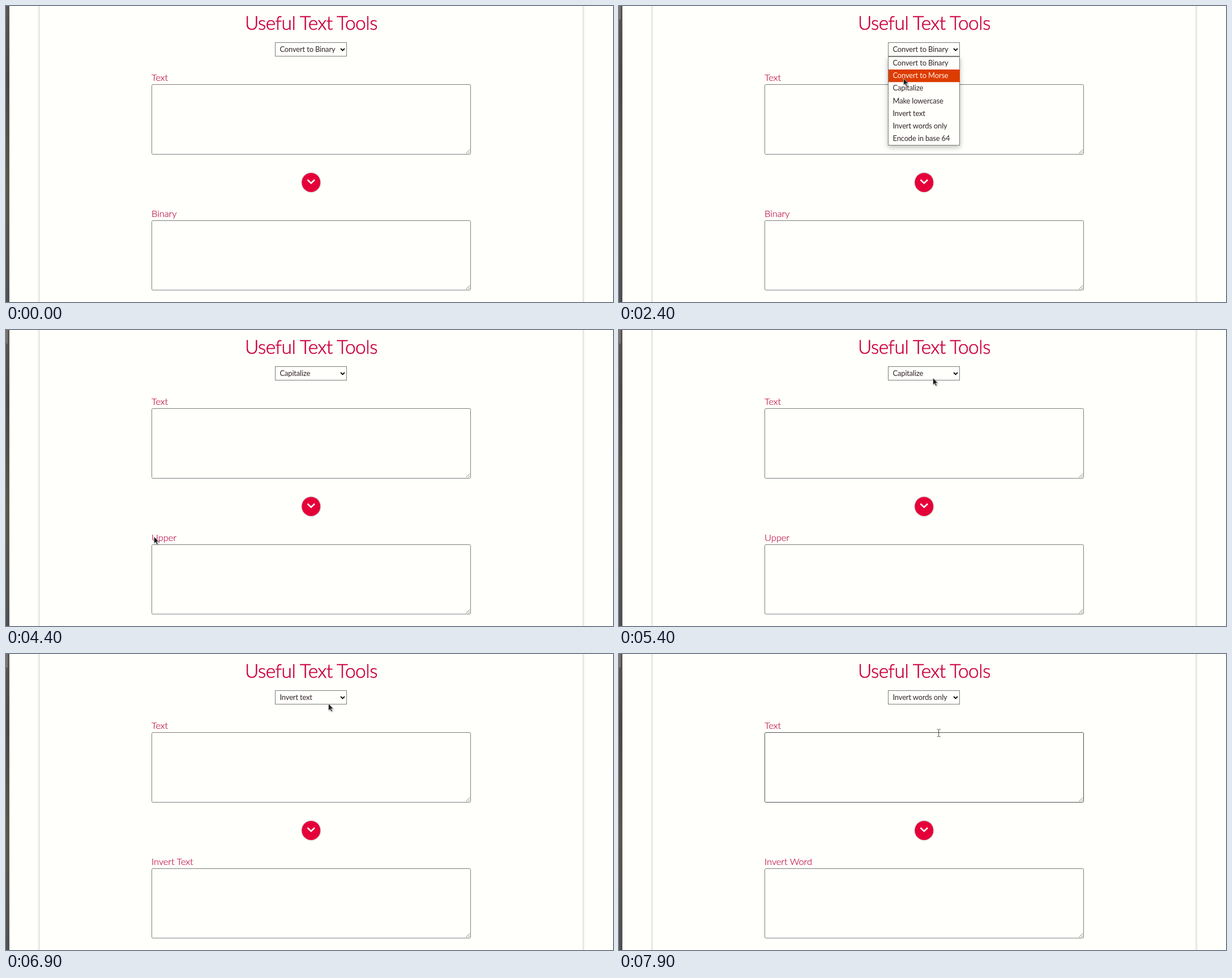
Write an HTML page that moves like this. It is 1072 px wide and 522 px high and loops after 8000 ms.

```html
<!DOCTYPE html>
<html lang="en">
<head>
<meta charset="utf-8">
<title>Useful Text Tools</title>
<style>
html, body { margin: 0; width: 100%; height: 100%; overflow: hidden; background: #fffffc; }
svg { display: block; width: 1072px; height: 522px; font-family: Lato, "Open Sans", sans-serif; }
.title { font-size: 33.5px; font-weight: 300; letter-spacing: -.5px; fill: #cc003f; stroke: #cc003f; stroke-width: .6; text-anchor: middle; }
.label { font-size: 16.5px; font-weight: 300; letter-spacing: -.1px; fill: #bd0a45; stroke: #bd0a45; stroke-width: .2; }
.option { font-size: 13px; letter-spacing: -.18px; fill: #33262a; }
.box { fill: #fffffc; stroke: #7c7c7c; }
.area.hover { stroke: #505050; }
.panel { fill: #fffffc; filter: drop-shadow(0 0 2px rgba(0, 0, 0, .33)); }
.menu { filter: drop-shadow(0 3px 5px rgba(0, 0, 0, .28)); }
.button { fill: #e60039; filter: drop-shadow(0 0 1px rgba(0, 0, 0, .5)); }
.line { fill: none; }
#arrow { filter: drop-shadow(1px 1px 1px rgba(0, 0, 0, .3)); }
</style>
</head>
<body>
<svg viewBox="0 0 1072 522">
  <defs>
    <linearGradient id="photo" x2="0" y2="1">
      <stop stop-color="#5a5552"/><stop offset=".25" stop-color="#4d4844"/>
      <stop offset=".6" stop-color="#5b5848"/><stop offset="1" stop-color="#505052"/>
    </linearGradient>
  </defs>
  <rect width="6" height="522" fill="url(#photo)"/>
  <rect id="patch" width="3" height="24" fill="#7b746c"/>
  <rect class="panel" x="59.5" y="-9" width="959" height="540"/>
  <text class="title" x="539" y="42">Useful Text Tools</text>

  <rect class="box" x="475.5" y="64.5" width="126" height="24"/>
  <text class="option" id="choice" x="483.5" y="81"></text>
  <path class="line" d="M591 75l3.5 3.5l3.5-3.5" stroke="#111" stroke-width="1.9"/>

  <text class="label" x="257" y="131.5">Text</text>
  <rect class="box area" id="input" x="257.5" y="138.5" width="563" height="123" rx="2"/>
  <text class="label" id="result" x="257" y="371.5"></text>
  <rect class="box area" x="257.5" y="378.5" width="563" height="122.5" rx="2"/>
  <path id="grip" class="line" d="M812.5 260l6.5-6.5m-2.5 6.5l2.5-2.5" stroke="#777"/>
  <use href="#grip" y="239.5"/>

  <ellipse class="button" cx="538.8" cy="311.2" rx="16.3" ry="16.8"/>
  <path class="line" d="M532.5 306.5l6.3 6l6.3-6" stroke="#fff" stroke-width="2.6"/>

  <g id="menu">
    <rect class="box menu" x="475.5" y="89.5" width="126" height="156"/>
    <rect id="mark" x="476" width="126" height="22.2" fill="#dd3c00"/>
    <g id="rows"></g>
  </g>

  <path id="arrow" d="M.5 .5v12.2l2.8-2.4l2 4.3l2-.9l-2-4.2h3.7z" fill="#1c1c1c" stroke="#eee" stroke-width=".7"/>
  <path id="beam" class="line" d="M-3-6.5h2l1 1l1-1h2M0-5.5v11M-3 6.5h2l1-1l1 1h2" stroke="#444"/>
</svg>
<script>
const el = id => document.getElementById(id);
const LOOP = 8000, ROW = 22.2, TOP = 89.8;
const options = ["Convert to Binary", "Convert to Morse", "Capitalize", "Make lowercase",
  "Invert text", "Invert words only", "Encode in base 64"];
const results = ["Binary", "Morse", "Upper", "Lower", "Invert Text", "Invert Word", "Base 64"];

// Pointer moves: start and end in tenths of a second, then the place reached
const moves = [
  [2, 2, 578, 72], [4, 6, 588, 86], [16, 24, 502, 127], [24, 27, 526, 148],
  [34, 36, 436, 214], [37, 41, 300, 369], [42, 45, 256, 363], [46, 49, 480, 200],
  [50, 54, 554, 84], [54, 61, 550, 181], [64, 69, 569, 87], [70, 76, 562, 206], [77, 80, 565, 131]];
const menus = [[17, 32], [55, 65], [71, 78]];

const easeOut = k => 1 - (1 - k) ** 2;
const rowAt = y => Math.floor((y - TOP) / ROW);
const show = (id, on) => el(id).style.display = on ? "" : "none";

function pointer(t) {
  let x = 0, y = 0, moving = false;
  for (const [start, end, toX, toY] of moves) {
    if (t < start) break;
    const k = end > start ? Math.min(1, (t - start) / (end - start)) : 1;
    x += (toX - x) * easeOut(k);
    y += (toY - y) * easeOut(k);
    moving = k > 0 && k < 1;
  }
  return { x, y, moving };
}

// A menu closes on the row under the pointer
function chosen(t) {
  const last = menus.findLast(([, close]) => close <= t);
  return last ? rowAt(pointer(last[1] - 1).y) : 0;
}

const rows = options.map((name, i) => {
  const row = document.createElementNS("http://www.w3.org/2000/svg", "text");
  row.setAttribute("class", "option");
  row.setAttribute("x", 483.5);
  row.setAttribute("y", 105 + i * ROW);
  row.textContent = name;
  return el("rows").appendChild(row);
});

function draw(ms) {
  const t = Math.floor(ms % LOOP / 100);
  const { x, y, moving } = pointer(t);
  const pick = chosen(t);
  const open = menus.some(([from, to]) => t >= from && t < to);
  const active = y < TOP ? pick : rowAt(y);
  const hover = moving && !open && y > 138 && y < 262;

  el("choice").textContent = options[pick];
  el("result").textContent = results[pick];
  el("input").classList.toggle("hover", hover);
  show("patch", t >= 17);
  show("menu", open);
  el("mark").setAttribute("y", TOP + active * ROW);
  rows.forEach((row, i) => row.style.fill = i === active ? "#fff0e8" : "");

  show("arrow", t >= 2 && !hover);
  show("beam", hover);
  for (const id of ["arrow", "beam"]) el(id).setAttribute("transform", `translate(${x} ${y})`);
}

function tick(now) {
  draw(now);
  requestAnimationFrame(tick);
}
draw(0);
requestAnimationFrame(tick);
</script>
</body>
</html>
```
